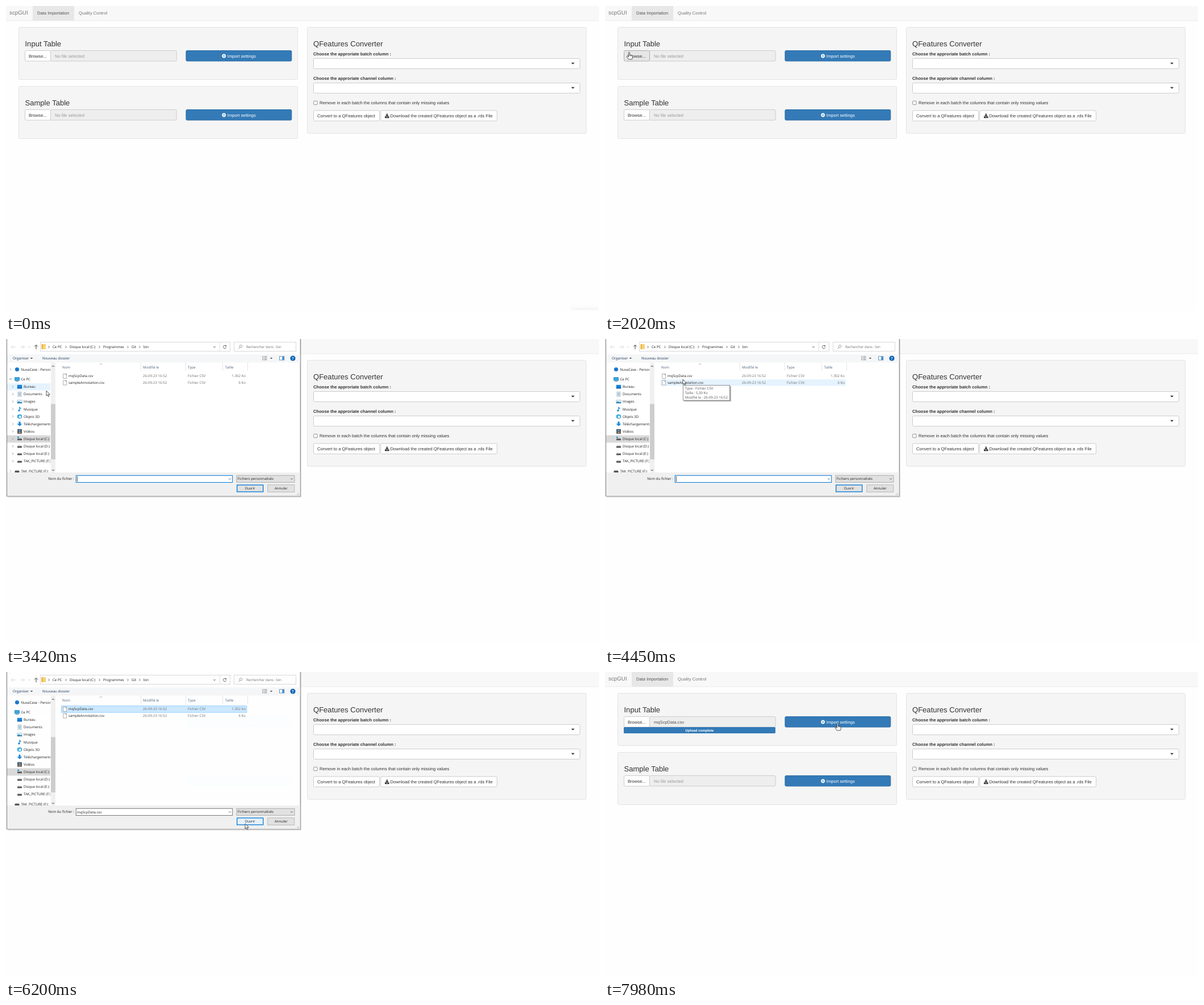
Recreate the animation shown at these times as an HTML page. Size 1044 by 537 pixels, loop 8000 ms.

```html
<!DOCTYPE html>
<html lang="en">
<head>
<meta charset="utf-8">
<title>Data importation</title>
<style>
html, body { margin: 0; width: 100%; height: 100%; overflow: hidden; background: #fefefe; }
svg { display: block; width: 100%; height: 100%; }
text { font-family: "Liberation Sans", Arial, sans-serif; white-space: pre; text-rendering: geometricPrecision; }
#dialog text { font-family: "Open Sans", "Noto Sans", sans-serif; }
</style>
</head>
<body>
<svg id="stage" viewBox="0 0 1044 537"></svg>
<script>
const $ = id => document.getElementById(id);

// Markup helpers; text is placed by the middle of its line.
const box = (x, y, x2, y2, fill, stroke = 'none', r = 0, more = '') =>
  `<rect x="${x}" y="${y}" width="${x2 - x}" height="${y2 - y}" rx="${r}" fill="${fill}" stroke="${stroke}" ${more}/>`;
const label = (x, mid, str, fill = '#333', size = 7.61, more = '') =>
  `<text x="${x}" y="${mid + size * .35}" font-size="${size}" fill="${fill}" ${more}>${str}</text>`;
const line = (d, stroke = '#444', w = .8, more = '') =>
  `<path d="${d}" fill="none" stroke="${stroke}" stroke-width="${w}" ${more}/>`;
const shape = (d, fill, more = '') => `<path d="${d}" fill="${fill}" ${more}/>`;
const group = (id, body, more = '') => `<g id="${id}" ${more}>${body}</g>`;
const ui = (x, mid, str, fill = '#1e1e1e', more = '') => label(x, mid, str, fill, 6.15, more);
const bold = 'font-weight="700"', end = 'text-anchor="end"', middle = 'text-anchor="middle"';
const right = (x, y, c) => line(`M${x - 1} ${y - 2}l2 2l-2 2`, c);
const down = (x, y, c) => line(`M${x - 2} ${y - 1}l2 2l2-2`, c);
const tri = (x, y, w, c = '#333') => shape(`M${x - w} ${y - w / 2}h${2 * w}l${-w} ${w}z`, c);

const gear = (x, y) => {
  let teeth = '';
  for (let a = 0; a < 360; a += 45)
    teeth += `<rect x="-.8" y="-3.7" width="1.6" height="2" fill="#fff" transform="rotate(${a})"/>`;
  return `<g transform="translate(${x} ${y})">${teeth}<circle r="1.9" fill="none" stroke="#fff" stroke-width="1.5"/></g>`;
};

const filePanel = (y, title, id) =>
  box(22.5, y + .5, 513.5, y + 92.5, '#f5f5f5', '#e3e3e3', 2) +
  label(33.5, y + 29, title, '#333', 13.05) +
  box(78.5, y + 41.5, 300.2, y + 60, '#eee', '#ccc', 2) +
  box(33.5, y + 41.5, 78.5, y + 60, '#fff', '#ccc', 2, `id="${id}Button"`) +
  label(40, y + 51, 'Browse...') +
  label(86, y + 51, 'No file selected', '#999', 7.61, `id="${id}File"`) +
  box(317, y + 41.5, 502.8, y + 60, '#337ab7', '#2e6da4', 2) +
  gear(383.7, y + 51) + label(389.8, y + 51, 'Import settings', '#fff');

const select = (mid, name) =>
  label(541, mid, name, '#333', 7.61, bold) +
  box(541.5, mid + 8.5, 1010.3, mid + 26.5, '#fff', '#ccc', 2) + tri(998, mid + 17.3, 3);

const page =
  box(0, 0, 1044, 26, '#f8f8f8') + box(0, 25.5, 1044, 26.3, '#e7e7e7') +
  box(47, 0, 120, 26, '#e7e7e7') +
  label(6, 12, 'scpGUI', '#777', 9.8) +
  label(55, 12, 'Data Importation', '#555') + label(128, 12, 'Quality Control', '#777') +
  filePanel(37, 'Input Table', 'input') +
  group('upload', box(33, 97, 300, 108, '#337ab7', 'none', 1.5, 'id="bar"') +
    label(0, 102.7, 'Upload complete', '#fff', 6.2, `id="done" ${bold} ${middle}`)) +
  filePanel(141, 'Sample Table', 'sample') +
  box(530.5, 37.5, 1021.5, 224.2, '#f5f5f5', '#e3e3e3', 2) +
  label(541, 66, 'QFeatures Converter', '#333', 13.05) +
  select(84, 'Choose the approriate batch column :') +
  select(127, 'Choose the approriate channel column :') +
  box(541.7, 167.3, 548, 173.7, '#fff', '#767676', 1, 'stroke-width=".8"') +
  label(552, 170.5, 'Remove in each batch the columns that contain only missing values') +
  box(541.5, 184, 657.5, 202.3, '#fff', '#ccc', 2) +
  label(548, 193.5, 'Convert to a QFeatures object') +
  box(659.8, 184, 864.5, 202.3, '#fff', '#ccc', 2) +
  shape('M669.8 189.5h2v3h2l-3 3l-3-3h2zM667 194.3h1.6l2.2 2l2.2-2h1.6v2.9h-7.6z', '#333') +
  label(676.6, 193.5, 'Download the created QFeatures object as a .rds File') +
  group('note', box(992, 526, 1044, 537, '#fcfcfc') + label(998, 533, 'Enregistrement', '#ebebeb', 6.6));

// Small icons of the folder tree, drawn around their centre.
const disk = box(-4, -.5, 4, 2.5, '#555', 'none', .6) + box(-3, -1.7, 3, -.5, '#c4c4c4');
const icons = {
  cloud: '<circle r="3.6" fill="#1a78d0"/>',
  pc: box(-4.2, -3.5, 4.2, 2.2, '#35a4e4', '#2878a8', .4, 'stroke-width=".6"') + box(-2.5, 3, 2.5, 3.8, '#58748a'),
  desk: box(-4.2, -3.2, 4.2, 3.2, '#1583d8') + box(-4.2, 1.8, 4.2, 3.2, '#0a5ca4'),
  doc: box(-3, -4, 3, 4, '#f2f6f8', '#8a9aa4', 0, 'stroke-width=".6"') + line('M-1.8-1.8h3.6M-1.8 0h3.6M-1.8 1.8h3.6', '#3b8fc4'),
  image: box(-4.2, -3, 4.2, 3, '#d7eefb', '#9aa', 0, 'stroke-width=".5"') + shape('M-4 2.7v-2l3-1.2l2 1.5l3-.6v2.3z', '#2b83b8'),
  note: line('M0 2.6v-6.4q.4 2 2.6 3.2', '#1488d8', 1.2) + '<circle cx="-1.2" cy="2.6" r="1.6" fill="#1488d8"/>',
  cube: shape('M-4-2.6l4-1.5l4 1.5v5.2l-4 1.5l-4-1.5z', '#29a5d8') + shape('M-1.5-1.5h4v4h-4z', '#e9f7fc'),
  arrow: shape('M-1.6-4h3.2v3.6h2.8l-4.4 4.4l-4.4-4.4h2.8z', '#1787dd'),
  film: box(-3.8, -4, 3.8, 4, '#38424c') + box(-2.2, -3, 2.2, -.4, '#6b8fae') + box(-2.2, .4, 2.2, 3, '#b08a64'),
  system: disk + box(-4, -4, -1, -1.6, '#18a0dd'),
  disk
};
const icon = (name, x, y) => `<g transform="translate(${x} ${y})">${icons[name]}</g>`;

const folders = [['desk', 'Bureau'], ['doc', 'Documents'], ['image', 'Images'], ['note', 'Musique'],
  ['cube', 'Objets 3D'], ['arrow', 'Téléchargements'], ['film', 'Vidéos'], ['system', 'Disque local (C:)'],
  ['disk', 'Disque local (D:)'], ['disk', 'Disque local (E:)'], ['disk', 'TAK_PICTURE (F:)']];
const rowY = i => 84 + i * 13.12;

const tree =
  box(2, 78, 78, 90.5, '#e5f3ff', 'none', 0, 'id="treeHover"') + box(2, 169.5, 78.5, 182.5, '#d9d9d9') +
  group('chevrons', right(8, 53.5, '#888') + down(8, 70.5, '#333') + right(8, 232.5, '#888') +
    folders.map((f, i) => right(12, rowY(i), '#888')).join('')) +
  icon('cloud', 19.5, 53.5) + ui(26.5, 53.5, 'NuvaCase - Personnel') +
  icon('pc', 19.5, 71) + ui(26.5, 71, 'Ce PC') +
  folders.map(([name, str], i) => icon(name, 24, rowY(i)) + ui(31, rowY(i), str)).join('') +
  icon('disk', 19.5, 232.5) + ui(26.5, 232.5, 'TAK_PICTURE (F:)');

const fileRow = (y, name, size) =>
  box(100.8, y - 4, 106.8, y + 4, '#fff', '#8c8c8c', 0, 'stroke-width=".7"') +
  line(`M104.8 ${y - 4}v2h2`, '#8c8c8c', .6) +
  ui(110, y, name) + ui(241, y, '26-09-23 16:52', '#6d6d6d') +
  ui(320, y, 'Fichier CSV', '#6d6d6d') + ui(422, y, size, '#6d6d6d', end);

const crumbs = [[82, 'Ce PC'], [112, 'Disque local (C:)'], [171, 'Programmes'], [221, 'Git'], [242, 'bin']];
const columns = [[99, 'Nom', 237.5], [241, 'Modifié le', 316.5], [320, 'Type', 381.5], [386, 'Taille', 425.5]];

const dialog =
  box(3, -5, 520, 279, '#000', 'none', 1, 'opacity=".12"') +
  box(1.5, -5, 518.2, 276.8, '#fff', '#7c7c7c') +
  line('M17 14h-7.5m3-3l-3 3l3 3M25 14h7.5m-3-3l3 3l-3 3', '#cfcfcf') + down(41, 14, '#ccc') +
  line('M53 18v-7.5m-3 3l3-3l3 3', '#444', 1) +
  box(60.5, 5.5, 394.5, 21.5, '#fff', '#d9d9d9') + line('M376.5 6v15', '#d9d9d9') +
  box(62.5, 9, 70, 18, '#f8d375', 'none', .6) + box(62.5, 9, 65, 18, '#e6b84c') +
  crumbs.map(([x, str]) => right(x - 6.5, 14) + ui(x, 14, str)).join('') +
  down(367, 14) + line('M387.3 12.4a2.7 2.7 0 1 0 .4 2.3M387.6 10.6v2.2h-2.2') +
  box(401.5, 5.5, 510.5, 21.5, '#fff', '#d9d9d9') +
  '<circle cx="413.5" cy="12.8" r="2.2" fill="none" stroke="#777" stroke-width=".7"/>' +
  line('M412 14.5l-2.5 2.8', '#777') + ui(423, 14, 'Rechercher dans : bin', '#6d6d6d') +
  box(2, 27, 517.7, 41.5, '#f5f6f7') + ui(12, 34, 'Organiser', '#1e395b') + tri(45, 34, 2.2) +
  ui(64, 34, 'Nouveau dossier', '#1e395b') +
  line('M451 31h2.5m1 0h5M451 33.8h2.5m1 0h5M451 36.6h2.5m1 0h5', '#777', 1) + tri(467, 34, 2.2) +
  box(481.5, 30.8, 489.8, 37, '#fff', '#4d7ba5', 0, 'stroke-width=".8"') + box(486.3, 31, 489.6, 37, '#3d8fd1') +
  '<circle cx="505" cy="34" r="4.6" fill="#0b63b4"/>' + label(505, 34.1, '?', '#fff', 7, bold + middle) +
  '<clipPath id="treeClip"><path d="M2 42h76.3v193h-76.3z"/></clipPath>' +
  group('tree', tree, 'clip-path="url(#treeClip)"') +
  box(79, 42, 87, 235, '#f0f0f0') + box(79, 114.5, 87, 212, '#cdcdcd') +
  line('M81 49l2-2l2 2M81 230l2 2l2-2', '#444', 1) +
  columns.map(([x, str, edge]) => ui(x, 49.7, str, '#4c607a') + line(`M${edge} 42v14`, '#e5e5e5', 1)).join('') +
  line('M165 45l2-2l2 2', '#888', .7) +
  box(97.5, 59.7, 423.8, 71.2, '#e5f3ff', 'none', 0, 'id="row1"') +
  box(97.5, 71.2, 423.8, 82.5, '#e5f3ff', 'none', 0, 'id="row2"') +
  fileRow(65.3, 'mqScpData.csv', '1.302 Ko') + fileRow(77, 'sampleAnnotation.csv', '6 Ko') +
  box(2, 235, 517.7, 276.3, '#f0f0f0') +
  ui(120, 246.3, 'Nom du fichier :', '#1e1e1e', end) +
  box(123.3, 240.3, 398.7, 252.5, '#fff', '#0078d7', 0, 'id="field"') +
  down(394, 246.5) + ui(125, 246.5, 'mqScpData.csv', '#1e1e1e', 'id="fieldText"') +
  line('M125.5 242v9', '#000', .7, 'id="caret"') +
  box(406, 240.3, 508, 252.3, '#e1e1e1', '#adadad') + ui(407.8, 246.3, 'Fichiers personnalisés') + down(503, 246.3) +
  box(406.7, 257, 452.7, 269, '#e1e1e1', '#0078d7', 0, 'id="open" stroke-width="1.3"') +
  ui(429.5, 263, 'Ouvrir', '#1e1e1e', middle) +
  box(460.8, 256.8, 507.8, 269.3, '#e1e1e1', '#adadad', 0, 'stroke-width=".8"') +
  ui(484.3, 263, 'Annuler', '#1e1e1e', middle) +
  line('M512 275l4-4M514.3 275l1.7-1.7', '#aaa') +
  group('tip', box(2, 2, 85, 29, '#000', 'none', 0, 'opacity=".3"') +
    box(.5, .5, 82.7, 27, '#fff', '#767676', 0, 'stroke-width=".8"') +
    ui(3.7, 5.5, 'Type : Fichier CSV', '#575757') + ui(3.7, 13.7, 'Taille : 5,30 Ko', '#575757') +
    ui(3.7, 21.8, 'Modifié le : 26-09-23 16:52', '#575757'));

const pointer = 'stroke="#111" stroke-width=".7" stroke-linejoin="round"';
const cursor =
  shape('M0 0V9L2 7.1L3.4 10.4L4.9 9.7L3.5 6.6H6.3Z', '#fff', `id="arrow" ${pointer}`) +
  group('hand', shape('M-1 .8Q0-.6 1 .8V5L5 5.8Q6 6.2 6 7.5V9.5L5 12.8H-1.2L-4 8.5Q-4.3 7-3 7L-1 8.6Z', '#fff', pointer) +
    line('M1 5v2.4M2.8 5.5v2M4.5 5.9v1.8', '#111', .6));

$('stage').innerHTML = page + group('dialog', dialog) + group('cursor', cursor);

// Pointer path: time, x, y
const path = [[270, 977, 537], [700, 393, 290], [1070, 124, 101], [1500, 60, 88], [1880, 43, 80], [2020, 42.5, 81],
  [2550, 45, 86], [3070, 46, 86], [3420, 71, 91], [3840, 82, 90], [4050, 137, 71], [4500, 137, 71], [4700, 148, 66],
  [4920, 150, 66], [5060, 162, 71], [5240, 392, 228], [5400, 457, 262], [5700, 421, 267], [6600, 421, 267],
  [7040, 413, 137], [7500, 409, 96], [7860, 409.3, 90]];

const clamp = v => Math.max(0, Math.min(1, v));
const show = (id, on) => $(id).setAttribute('visibility', on ? 'inherit' : 'hidden');
const set = (id, attrs) => { for (const k in attrs) $(id).setAttribute(k, attrs[k]); };

function pointerAt(t) {
  const i = path.findIndex(p => p[0] > t);
  if (i < 0) return path[path.length - 1].slice(1);
  if (!i) return path[0].slice(1);
  const [t0, x0, y0] = path[i - 1], [t1, x1, y1] = path[i], k = (t - t0) / (t1 - t0);
  return [x0 + (x1 - x0) * k, y0 + (y1 - y0) * k];
}

function draw(t) {
  const within = (a, b) => t >= a && t < b;
  const [x, y] = pointerAt(t);
  const dialogOn = within(3070, 6300), picked = t >= 4920;
  const overPage = !dialogOn && y > 78 && y < 97.5;
  const browse = overPage && x > 33 && x < 79, importing = overPage && x > 316 && x < 503;

  show('note', t < 30);
  show('cursor', t >= 270);
  set('cursor', { transform: `translate(${x} ${y})` });
  show('hand', browse || importing);
  show('arrow', !(browse || importing));

  set('inputButton', {
    fill: browse ? within(2720, 2820) ? '#d4d4d4' : '#e6e6e6' : '#fff',
    stroke: browse ? '#adadad' : '#ccc'
  });
  $('inputFile').textContent = t >= 6200 ? 'mqScpData.csv' : 'No file selected';
  set('inputFile', { fill: t >= 6200 ? '#555' : '#999' });

  const width = 267 * (1 - (1 - clamp((t - 6466) / 600)) ** 2.3);
  show('upload', width > 0);
  set('bar', { width });
  set('done', { x: 33 + width / 2 });
  show('done', width > 50);

  show('dialog', dialogOn);
  set('dialog', { opacity: Math.min(clamp((t - 3040) / 100), clamp((6300 - t) / 100)) });
  show('treeHover', t < 3880);
  set('chevrons', { opacity: clamp((4150 - t) / 250) });
  show('row1', t >= 4620);
  set('row1', { fill: picked ? '#cce8ff' : '#e5f3ff', stroke: picked ? '#99d1ff' : 'none' });
  show('row2', within(3960, 4620) || within(5020, 5080));
  show('tip', within(4350, 4620) || within(5060, 5500));
  set('tip', { transform: `translate(${picked ? 162 : 137} 81)` });
  set('field', { stroke: picked ? '#7a7a7a' : '#0078d7' });
  show('fieldText', picked);
  show('caret', !picked && (t - 3070) % 1060 < 530);
  set('open', { fill: within(5790, 6060) ? '#cce4f7' : t >= 5380 ? '#e5f1fb' : '#e1e1e1' });
}

function tick() {
  draw(performance.now() % 8000);
  requestAnimationFrame(tick);
}
tick();
</script>
</body>
</html>
```
